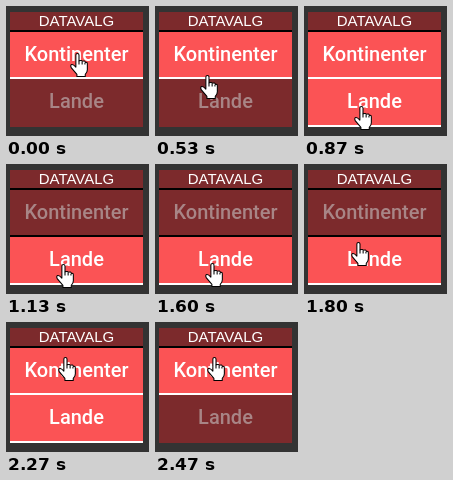
Recreate the animation shown at these times as an HTML page. Size 143 by 130 pixels, loop 2.74 s.

```html
<!DOCTYPE html>
<html lang="da">
<head>
<meta charset="utf-8">
<title>Datavalg</title>
<style>
  html, body { margin: 0; width: 100%; height: 100%; overflow: hidden; background: #333; }
  #stage { --dim: #7c2a2c; position: relative; width: 143px; height: 130px; overflow: hidden; text-align: center; }
  #stage > * { position: absolute; box-sizing: border-box; }
  #head, .choice { left: 4px; width: 133px; border-bottom: 2px solid #000; }
  #head { top: 6px; height: 20px; background: var(--dim); color: #fff; font: 15px/18px "Liberation Sans", Arial, sans-serif; }
  .choice { font: 500 20px/45px Roboto, sans-serif; }
  #continents { top: 26px; height: 47px; }
  #countries { top: 73px; height: 48px; }
  #hand { left: 0; top: 0; width: 18px; height: 24px; }
</style>
</head>
<body>
<div id="stage">
  <div id="head">DATAVALG</div>
  <div id="continents" class="choice">Kontinenter</div>
  <div id="countries" class="choice">Lande</div>
  <svg id="hand" viewBox="0 0 17 23" stroke="#000" stroke-linejoin="round">
    <path fill="#fff" d="M5.5 2Q5.5.5 7 .5T8.5 2V7.5Q11.5 6.5 11.5 8Q14.5 7 14.5 9Q16.5 8.5 16.5 10.5V16Q16.5 18.5 14.5 20.5V22.5H6.5V20.5L1 14Q0 11.5 1.5 11Q3 10.6 5.5 13.5Z"/>
    <path fill="none" d="M8.5 7.5V11M11.5 8.5V11M14.2 9.5V11"/>
  </svg>
</div>
<script>
  const LOOP = 2740;
  const $ = id => document.getElementById(id);

  // Fifteen pictures a second, on whole hundredths.
  const tickTime = tick => 10 * Math.round(tick * 20 / 3);

  // Each frame stays until the next one's tick.
  function hold(id, frames) {
    const keys = frames.map(({ tick, ...style }) =>
      ({ ...style, offset: tickTime(tick) / LOOP, easing: 'steps(1, end)' }));
    keys.push({ ...keys[keys.length - 1], offset: 1 });
    $(id).animate(keys, { duration: LOOP, iterations: Infinity }).startTime = 0;
  }

  const look = (tick, lit, dimBorder) => lit
    ? { tick, backgroundColor: '#fb5355', color: '#fff', borderBottomColor: '#fff' }
    : { tick, backgroundColor: '#7c2a2c', color: '#a88586', borderBottomColor: dimBorder };

  hold('continents', [look(0, true), look(17, false, '#000'), look(28, true)]);
  hold('countries', [look(0, false, '#7c2a2c'), look(9, true), look(37, false, '#7c2a2c')]);

  // Turning points of the pointer: tick, x, y.
  const turns = [
    [3, 64, 47], [8, 45, 69], [11, 44, 94], [13, 50, 100],
    [23, 50, 100], [24, 50, 99], [29, 45, 64], [34, 52, 35]
  ];

  function pointerAt(tick) {
    const next = turns.findIndex(([t]) => t > tick);
    if (next < 1) return next ? turns[turns.length - 1].slice(1) : turns[0].slice(1);
    const [t0, ...from] = turns[next - 1];
    const [t1, ...to] = turns[next];
    return from.map((v, i) => Math.round(v + (to[i] - v) * (tick - t0) / (t1 - t0)));
  }

  hold('hand', Array.from({ length: 41 }, (_, tick) => {
    const [x, y] = pointerAt(tick);
    return { tick, transform: `translate(${x}px, ${y}px)` };
  }));
</script>
</body>
</html>
```
